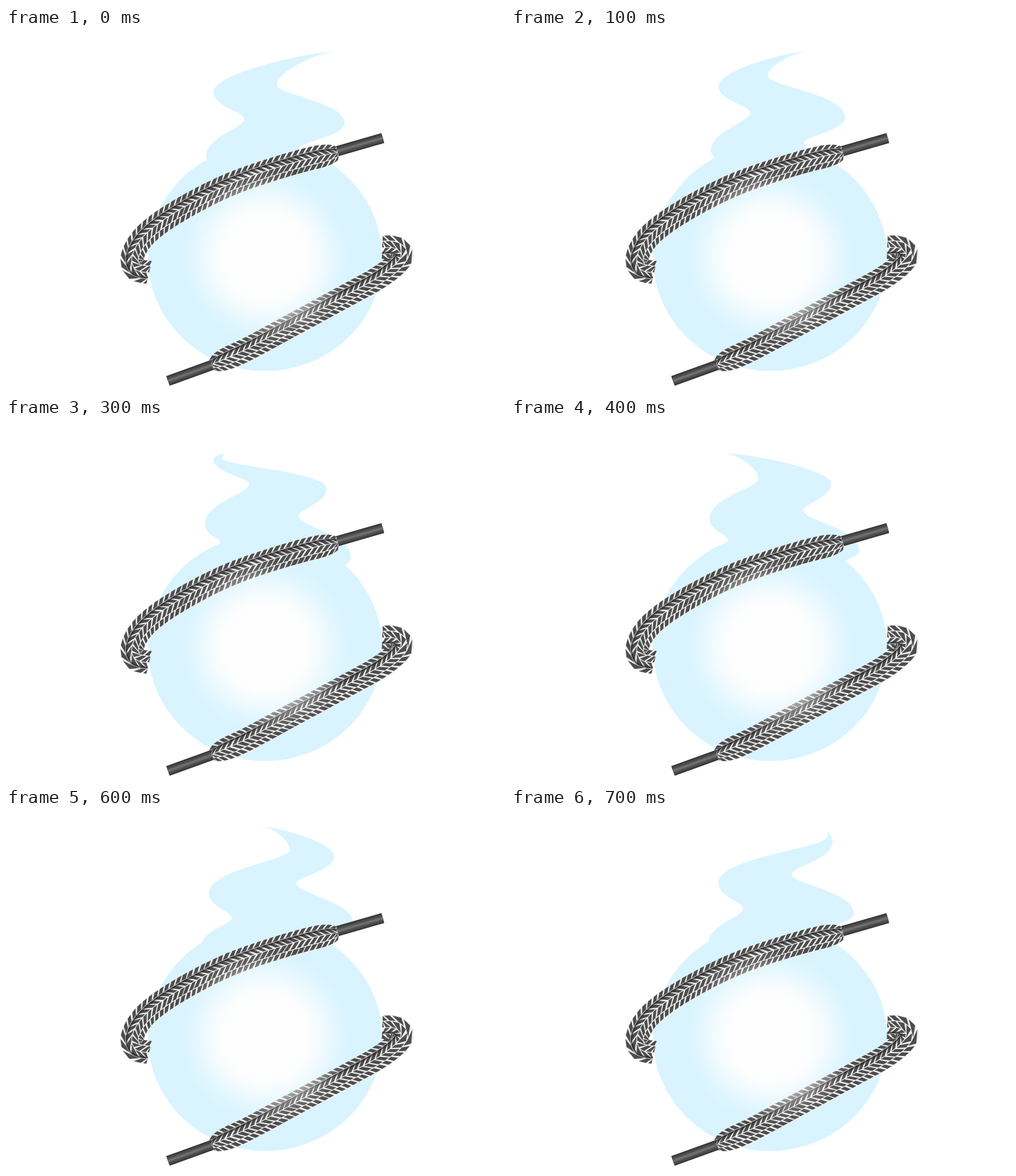
Animation of 878 by 638 pixels, one loop 0.8 s. Source, as an HTML page with a canvas:

```html
<!DOCTYPE html>
<html lang="en">
<head>
<meta charset="utf-8">
<title>Smoke and cord</title>
<style>
  html, body { margin: 0; width: 100%; height: 100%; overflow: hidden; background: #fff; }
  canvas { display: block; }
</style>
</head>
<body>
<canvas id="stage" width="878" height="638"></canvas>
<script>
const ctx = document.getElementById('stage').getContext('2d');
const BLUE = '#d9f4ff', DARK = '#4d4d4e', LIGHT = '#f1f1ef';
const CYCLE = 6;                              // beats per loop
const beats = [0, .5, 1, 2, 2.5, 3, 4, 5];    // one every 100 ms

// Each turning point of the smoke rises along a rail of [age in beats, x, y];
// a new one sets out on every loop. Bulges are rounder than notches.
const leftRails = [
  { bend: .55, keys: [[-4, 340, 247], [-1, 347, 240], [0, 352, 228], [3, 349, 168], [5, 365, 132], [8, 365, 73]] },
  { bend: .25, keys: [[1, 367, 230], [3, 387, 210], [6, 419, 160], [8, 428, 116], [9, 442, 97], [11, 557, 50]] }
];
const rightRails = [
  { bend: .55, keys: [[2, 607, 245], [3, 619, 222], [6, 596, 167], [8, 564, 124], [9, 563, 107], [10, 577, 85], [11, 566, 60]] },
  { bend: .25, keys: [[-4, 596, 262], [-1, 530, 222], [0, 516, 212], [3, 514, 153], [4, 511, 133], [6, 477, 101], [7, 427, 68], [8, 380, 71]] }
];
const tipRail = [[0, 578, 41], [1, 460, 41], [2, 386, 62], [3, 376, 62], [4, 455, 33], [5, 556, 41], [6, 578, 41]];

function along(keys, age) {
  const i = keys.findIndex(k => k[0] >= age);
  if (i < 0 || age < keys[0][0]) return null;
  const b = keys[i], a = keys[Math.max(0, i - 1)];
  const t = a === b ? 0 : (age - a[0]) / (b[0] - a[0]);
  return { x: a[1] + (b[1] - a[1]) * t, y: a[2] + (b[2] - a[2]) * t };
}

function side(rails, beat) {
  const nodes = [];
  for (const { bend, keys } of rails)
    for (const age of [beat - CYCLE, beat, beat + CYCLE]) {
      const p = along(keys, age);
      if (p) nodes.push({ ...p, bend });
    }
  return nodes.sort((a, b) => a.y - b.y);
}

function smokePath(beat) {
  const tip = along(tipRail, beat);
  const nodes = [...side(rightRails, beat).reverse(), tip, ...side(leftRails, beat)];
  const handle = (a, b) => {
    const dx = b.x - a.x, dy = b.y - a.y;
    if (a === tip) return [a.x + .37 * dx, a.y + .1 * dy];
    return [a.x, a.y + dy * (b === tip ? .4 : a.bend)];
  };
  const path = new Path2D();
  path.moveTo(560, 300);
  path.lineTo(nodes[0].x, nodes[0].y);
  for (let i = 1; i < nodes.length; i++) {
    const a = nodes[i - 1], b = nodes[i];
    path.bezierCurveTo(...handle(a, b), ...handle(b, a), b.x, b.y);
  }
  path.lineTo(400, 300);
  return path;
}

// Cord centre lines, from the tucked tail to the tapered end
const upper = [[252, 430], [228, 424], [224, 399], [250, 361], [312, 318], [400, 274], [505, 239], [584, 220]];
const lower = [[662, 386], [686, 387], [696, 405], [661, 437], [590, 477], [500, 526], [420, 569], [362, 594]];

function spline(pts, u) {
  const last = pts.length - 1, i = Math.min(Math.floor(u), last - 1), t = u - i;
  const [a, b, c, d] = [-1, 0, 1, 2].map(k => pts[Math.max(0, Math.min(last, i + k))]);
  return [0, 1].map(k => b[k] + t / 2 * (c[k] - a[k] +
    t * (2 * a[k] - 5 * b[k] + 4 * c[k] - d[k] + t * (3 * (b[k] - c[k]) + d[k] - a[k]))));
}

function polygon(pts) {
  const path = new Path2D();
  pts.forEach(p => path.lineTo(...p));
  return path;
}

// flip puts the crease on the left (1) or right (-1) of the direction of travel
function makeRope(pts, flip) {
  const rows = [], end = pts.length - 1;
  let len = 0;
  for (let u = 0; u < end; u += .02) {
    const [x, y] = spline(pts, u), [x1, y1] = spline(pts, u + .01);
    const d = Math.hypot(x1 - x, y1 - y);
    rows.push({ x, y, len, nx: flip * (y1 - y) / d, ny: flip * (x - x1) / d });
    len += 2 * d;
  }
  const at = (s, v) => {
    const r = rows.find(row => row.len >= s) || rows[rows.length - 1];
    const left = Math.min(1, (len - r.len) / 42);
    const w = (8 + 13 * Math.sqrt(left * (2 - left))) * (1 - 2 * v);
    return [r.x + r.nx * w, r.y + r.ny * w];
  };
  const edge = v => rows.map(r => at(r.len, v));
  const bricks = new Path2D(), step = 11.5, wide = 8.2;
  // Each band: near side, far side, slant along the cord, offset
  for (const [v0, v1, slant, off] of [[0, .22, -8, 0], [.22, .48, 12, 4], [.48, .76, -12, 6], [.76, 1, -8, 1]])
    for (let s = off - step; s < len + step; s += step) {
      const brick = polygon([at(s, v0), at(s + wide, v0), at(s + wide + slant, v1 - .03), at(s + slant, v1 - .03)]);
      brick.closePath();
      bricks.addPath(brick);
    }
  return { outline: polygon([...edge(0), ...edge(1).reverse()]), crease: polygon(edge(.25)), bricks };
}

function stroke(path, color, width) {
  ctx.strokeStyle = color;
  ctx.lineWidth = width;
  ctx.stroke(path);
}

function drawRope({ outline, crease, bricks }) {
  ctx.fillStyle = LIGHT;
  ctx.fill(outline);
  ctx.fillStyle = DARK;
  ctx.fill(bricks);
  stroke(crease, 'rgba(40,40,40,.3)', 6);
  stroke(crease, 'rgba(35,35,35,.7)', 2);
}

function drawAglet(from, to) {
  const path = polygon([from, to]);
  stroke(path, '#383838', 18);
  stroke(path, '#4a4a4a', 13);
  stroke(path, '#5c5c5c', 7);
  stroke(path, '#727272', 2.5);
}

const body = new Path2D();
body.ellipse(456, 405, 206, 199.5, 0, 0, 2 * Math.PI);

const glow = ctx.createRadialGradient(456, 403, 0, 456, 403, 155);
for (let r = 0; r <= 1; r += .125) {
  const t = Math.max(0, (r - .42) / .58);
  glow.addColorStop(r, `rgba(254,254,254,${1 - t * t * (3 - 2 * t)})`);
}

const smokes = beats.map(smokePath);
const ropes = [makeRope(upper, 1), makeRope(lower, -1)];

function draw(now) {
  ctx.fillStyle = '#fff';
  ctx.fillRect(0, 0, 878, 638);
  ctx.fillStyle = BLUE;
  ctx.fill(body);
  ctx.fill(smokes[Math.floor(now / 100) % smokes.length]);
  drawAglet([578, 218.5], [663, 194]);
  drawAglet([285, 622], [368, 592]);
  ropes.forEach(drawRope);
  ctx.fillStyle = glow;
  ctx.fillRect(300, 245, 312, 316);
  requestAnimationFrame(draw);
}
requestAnimationFrame(draw);
</script>
</body>
</html>
```
